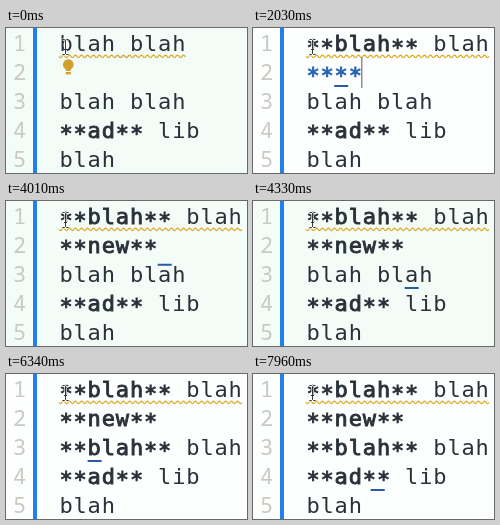
An HTML page with a canvas for the animation above (8000 ms loop, 241 by 145 pixels).

```html
<!DOCTYPE html>
<html lang="en">
<head>
<meta charset="utf-8">
<title>Markdown editing</title>
<style>
html, body { margin: 0; width: 100%; height: 100%; overflow: hidden; background: #f4fcf8; }
canvas { display: block; width: 241px; height: 145px; }
</style>
</head>
<body>
<canvas id="stage"></canvas>
<script>
const LOOP = 8000, W = 241, H = 145;
const LEFT = 53, CELL = 14.1, LINE = 28.9, BASE = 23;
const INK = '#2a3139', BLUE = '#2563b5', GOLD = '#deab2b';
const FONT = '22px "DejaVu Sans Mono", monospace';
const NUMBER_FONT = '300 22px "Noto Sans Mono", monospace';

// When each edit happens
const WRAP_FIRST = 370, OPEN_BOLD = 1850, TYPE = 2450, KEY = 185;
const LEAVE = 3250, WRAP_THIRD = 6340;
const WORD = 'new';

const canvas = document.getElementById('stage');
const dpr = window.devicePixelRatio || 1;
canvas.width = W * dpr;
canvas.height = H * dpr;
const g = canvas.getContext('2d');
g.scale(dpr, dpr);

const clamp = v => Math.max(0, Math.min(1, v));
const colX = col => LEFT + col * CELL;

// Cursor script: each call moves it from where the last one left it
const moves = [];
let col = 4, row = 0;
function go(start, toCol, toRow, dur = 140) {
  moves.push({ start, dur, col, row, dCol: toCol - col, dRow: toRow - row });
  [col, row] = [toCol, toRow];
}
go(0, col, row);
go(WRAP_FIRST, 8, row);
go(1070, 0, row + 1);
go(OPEN_BOLD, 2, row);
for (let i = 0; i < WORD.length; i++) go(TYPE + i * KEY, col + 1, row, 70);
go(LEAVE, col + 2, row, 0);
go(3990, col, row + 1, 200);
go(4490, col - 1, row);
for (let t = 4760; col > 2; t += 150) go(t, col - 1, row, 130);
go(WRAP_THIRD, col + 2, row);
go(6840, 8, row, 0);
go(7050, col, row + 1);
go(7390, col - 2, row, 80);
go(7897, col - 2, row);

function linesAt(t) {
  const count = Math.max(0, Math.floor((t - TYPE) / KEY) + 1);
  const phrase = wrapAt => t < wrapAt ? 'blah blah' : '**blah** blah';
  return [
    phrase(WRAP_FIRST),
    t < OPEN_BOLD ? '' : `**${WORD.slice(0, count)}**`,
    phrase(WRAP_THIRD),
    '**ad** lib',
    'blah'
  ];
}

function rect(color, x, y, w, h) {
  g.fillStyle = color;
  g.fillRect(x, y, w, h);
}

function drawLine(text, row) {
  const y = BASE + row * LINE, boldEnd = text.lastIndexOf('*');
  g.font = NUMBER_FONT;
  g.fillStyle = '#c9cac2';
  g.fillText(row + 1, 7, y);
  g.font = FONT;
  g.fillStyle = g.strokeStyle = text === '****' ? BLUE : INK;
  g.lineWidth = 0.9;
  [...text].forEach((ch, i) => {
    const x = colX(i) + 0.4, top = y + (ch === '*' ? 3.5 : 0);
    g.fillText(ch, x, top);
    if (i <= boldEnd) g.strokeText(ch, x, top);
  });
}

function drawSquiggle(length) {
  g.beginPath();
  for (let x = LEFT; x <= colX(length); x += 0.5)
    g.lineTo(x, 28.3 + 1.2 * Math.sin((x - LEFT) * Math.PI / 3));
  g.strokeStyle = GOLD;
  g.lineWidth = 1.3;
  g.stroke();
}

function drawBulb() {
  g.fillStyle = '#cfa02c';
  g.beginPath();
  g.arc(62.3, 36.6, 5.3, 0, 2 * Math.PI);
  g.fill();
  g.fillRect(59.8, 40, 5, 3);
  g.fillRect(59.8, 44, 5, 2.4);
}

function drawPointer() {
  const beam = new Path2D('M56.5 11.5h2l1 1 1-1h2M59.5 12.5V25.5M56.5 26.5h2l1-1 1 1h2M58 21.5h3');
  g.strokeStyle = 'rgba(255,255,255,.8)';
  g.lineWidth = 2.6;
  g.stroke(beam);
  g.strokeStyle = '#333';
  g.lineWidth = 1;
  g.stroke(beam);
}

// The cursor blinks out while it rests before each wrap
function cursorAlpha(t) {
  if (t < 310) return clamp(0.1 - t / 500);
  return t < WRAP_THIRD ? 1 - clamp((t - 5930) / 210) : 1;
}

function drawCursor(t) {
  const m = moves.findLast(m => m.start <= t);
  const u = m.dur ? clamp((t - m.start) / m.dur) : 1;
  const k = 1 - (1 - u) ** 2;
  g.globalAlpha = cursorAlpha(t);
  rect('#285aa5', colX(m.col + m.dCol * k), 28 + 29 * (m.row + m.dRow * k), 14, 2);
  g.globalAlpha = 1;
}

function draw(t) {
  const green = t < WRAP_FIRST || (t >= LEAVE && t < WRAP_THIRD);
  const lines = linesAt(t);
  rect(green ? '#f4fcf8' : '#fdfefe', 0, 0, W, H);
  rect('#2080f0', 27, 0, 4, H);
  lines.forEach(drawLine);
  drawSquiggle(lines[0].length);
  if (t < 1340) drawBulb();
  if (t >= OPEN_BOLD && t < LEAVE)
    rect('#8b9294', Math.floor(colX(lines[1].length)) - 1, 29, 1.5, 31);
  drawCursor(t);
  drawPointer();
}

const origin = performance.now();
function tick() {
  draw((performance.now() - origin) % LOOP);
  requestAnimationFrame(tick);
}
tick();
</script>
</body>
</html>
```
